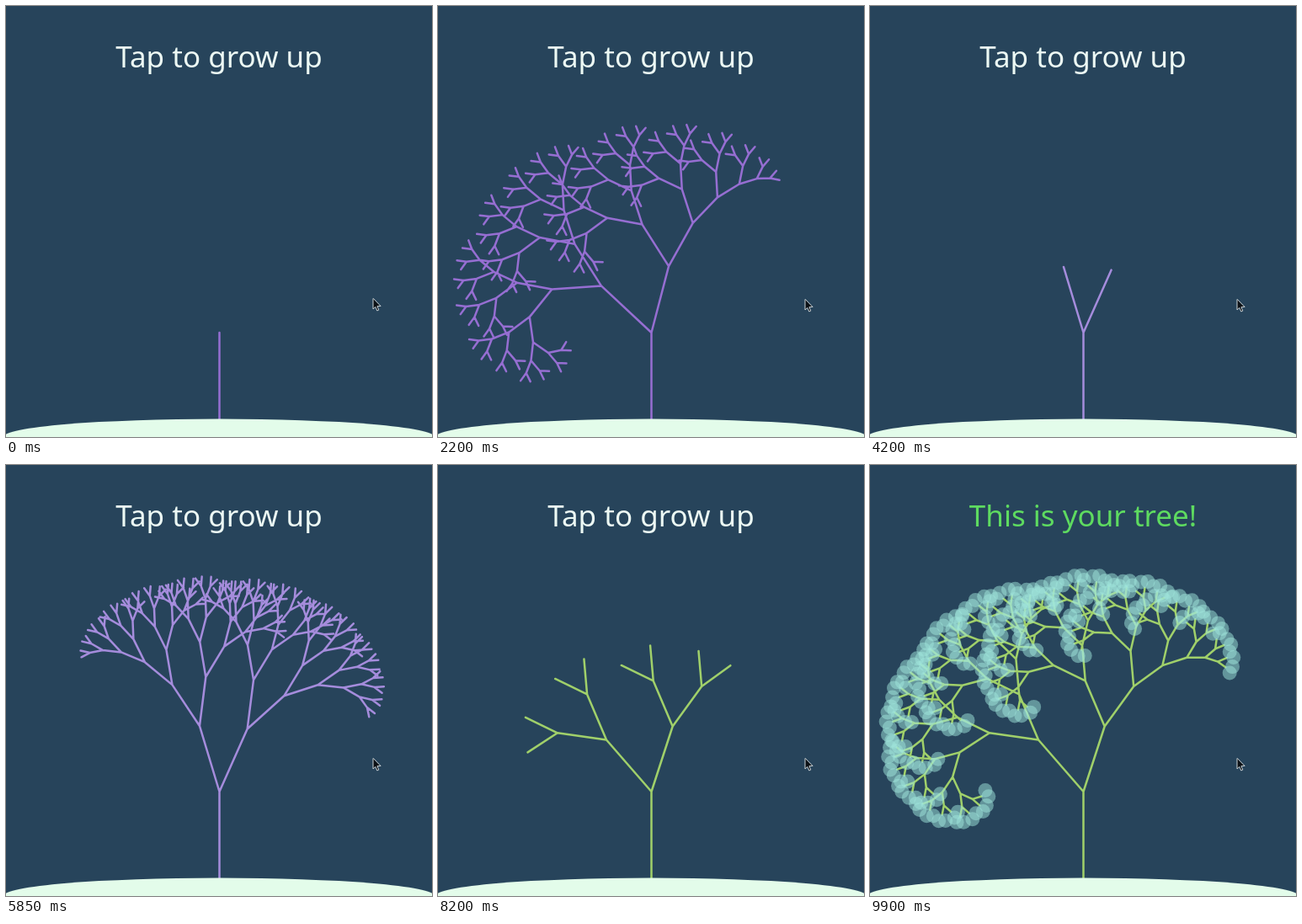
Recreate the animation shown at these times as an HTML page with a canvas. Size 506 by 512 pixels, loop 10000 ms.

```html
<!DOCTYPE html>
<html>
<head>
<meta charset="utf-8">
<style>
html, body { margin: 0; width: 100%; height: 100%; overflow: hidden; background: #27445b; }
canvas { display: block; }
</style>
</head>
<body>
<canvas id="stage" width="506" height="512"></canvas>
<script>
const ctx = document.getElementById('stage').getContext('2d');
const LOOP = 10000, DEPTH = 7, RATIO = 0.72;
const rad = deg => deg * Math.PI / 180;

// start: trunk only; taps: times at which a level is added; bloom: leaves appear
const trees = [
  { start: 0, taps: [350, 700, 1050, 1500, 1750, 1950, 2150], bloom: 2450,
    left: 47, right: 14.6, wood: '#966ed2', leaf: 'rgba(178,205,205,.5)' },
  { start: 3800, taps: [4100, 4350, 4600, 4850, 5100, 5400, 5700], bloom: 6000,
    left: 16.8, right: 24, wood: '#a58cdc', leaf: 'rgba(181,211,165,.5)' },
  { start: 7400, taps: [7650, 7850, 8050, 8250, 8450, 8650, 8850], bloom: 9250,
    left: 41, right: 18, wood: '#a0d06a', leaf: 'rgba(160,230,220,.5)' }
];

function grow(tree, x, y, angle, len, level, limit, tips) {
  const x2 = x + len * Math.sin(rad(angle));
  const y2 = y - len * Math.cos(rad(angle));
  if (level > DEPTH) {
    tips.push([x2, y2]);
    return;
  }
  ctx.moveTo(x, y);
  ctx.lineTo(x2, y2);
  if (level < limit) {
    const next = level ? len * RATIO : 81.5;
    grow(tree, x2, y2, angle - tree.left, next, level + 1, limit, tips);
    grow(tree, x2, y2, angle + tree.right, next, level + 1, limit, tips);
  }
}

function drawTree(tree, t, bloomed) {
  const level = tree.taps.filter(tap => t >= tap).length;
  const tips = [];
  ctx.strokeStyle = tree.wood;
  ctx.lineWidth = 2.5;
  ctx.lineCap = 'round';
  ctx.beginPath();
  grow(tree, 253.5, 492, 0, 104, 0, bloomed ? DEPTH + 1 : level, tips);
  ctx.stroke();
  ctx.fillStyle = tree.leaf;
  for (const [x, y] of tips) {
    ctx.beginPath();
    ctx.arc(x, y, 8.5, 0, 7);
    ctx.fill();
  }
}

function drawCursor(x, y) {
  const shape = [[0, 0], [0, 12.5], [2.8, 10], [4.8, 14.5], [6.8, 13.6], [4.9, 9.2], [8.7, 9]];
  ctx.beginPath();
  shape.forEach(([dx, dy]) => ctx.lineTo(x + dx, y + dy));
  ctx.closePath();
  ctx.fillStyle = '#0c1116';
  ctx.strokeStyle = '#c8d0d4';
  ctx.lineWidth = 1;
  ctx.fill();
  ctx.stroke();
}

function draw(t) {
  const tree = trees.filter(item => t >= item.start).pop();
  const bloomed = t >= tree.bloom;
  ctx.fillStyle = '#27445b';
  ctx.fillRect(0, 0, 506, 512);

  drawTree(tree, t, bloomed);

  ctx.fillStyle = '#e3fcea';
  ctx.beginPath();
  ctx.ellipse(253, 512, 256, 21.5, 0, 0, 7);
  ctx.fill();

  ctx.font = '35px "Noto Sans", "Open Sans", sans-serif';
  ctx.textAlign = 'center';
  ctx.fillStyle = bloomed ? '#5edb60' : '#ecf9f4';
  ctx.fillText(bloomed ? 'This is your tree!' : 'Tap to grow up', 253, 73);

  drawCursor(436, t < 300 ? 347.5 : 348.5);
}

const begin = performance.now();
function tick() {
  draw((performance.now() - begin) % LOOP);
  requestAnimationFrame(tick);
}
tick();
</script>
</body>
</html>
```
